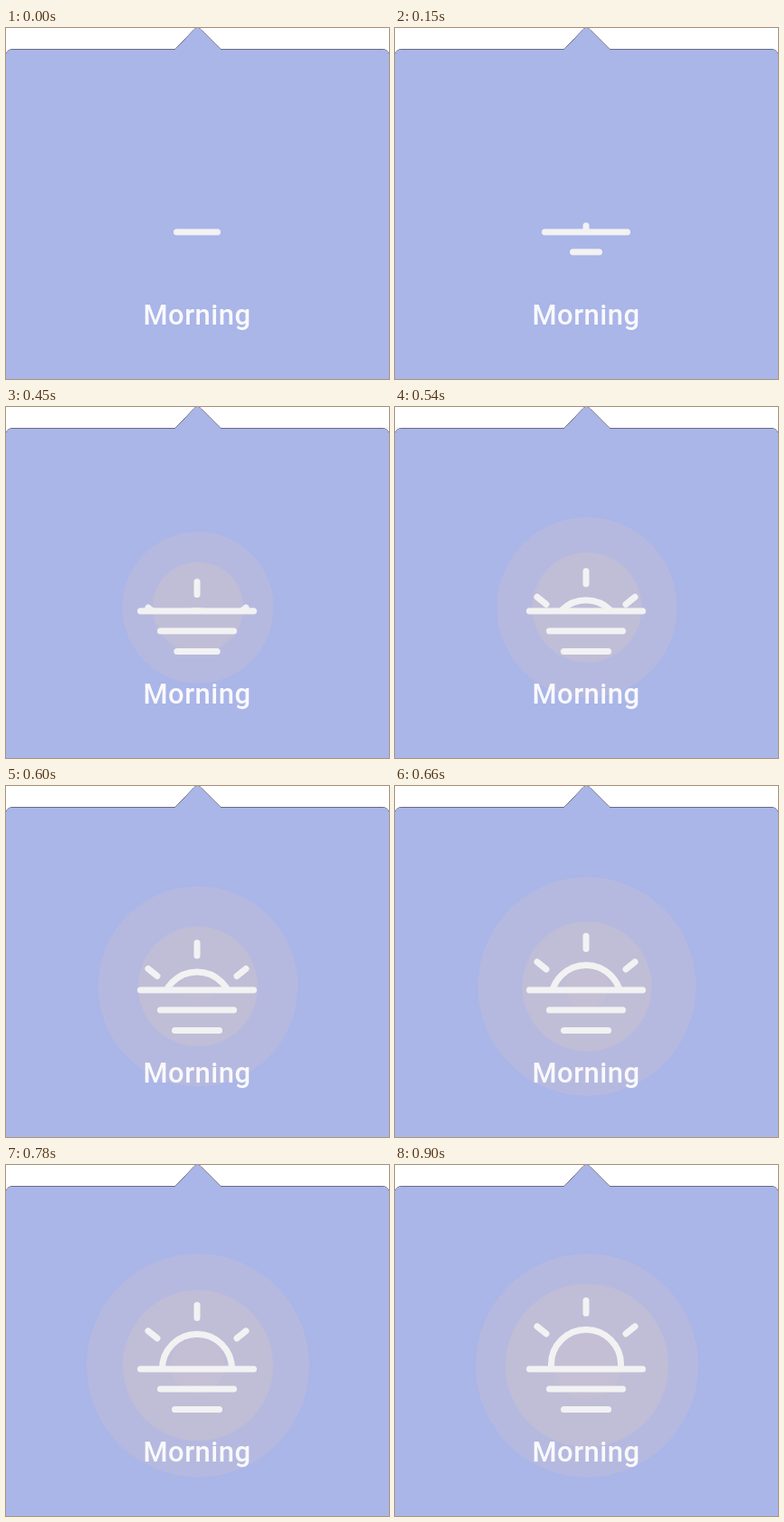
An HTML page with a canvas that plays this animation: 423x387 px, repeating every 1380 ms.

```html
<!DOCTYPE html>
<html lang="en">
<head>
<meta charset="utf-8">
<title>Morning</title>
<style>
html, body { margin: 0; width: 100%; height: 100%; overflow: hidden; background: #fff; }
canvas { display: block; }
</style>
</head>
<body>
<canvas id="stage" width="423" height="387"></canvas>
<script>
const ctx = document.getElementById('stage').getContext('2d');
const LOOP = 1380, STEP = 30, CX = 211, HORIZON = 225;

// Keys are [ms, value]; bars use half their full length.
const bars = [
  { y: HORIZON, keys: [[-150, 0], [0, 26], [150, 49], [300, 66]] },
  { y: 247, keys: [[0, 0], [150, 18], [300, 37], [450, 44]] },
  { y: 269.5, keys: [[170, 0], [300, 13.5], [420, 24], [540, 28]] }
];
const rings = [
  { alpha: 0.15, keys: [[180, 36], [300, 57], [540, 99.5], [660, 120.5], [690, 123]] },
  { alpha: 0.15, keys: [[330, 41], [540, 60.5], [660, 71.5], [780, 83], [900, 90]] },
  { alpha: 0.06, keys: [[570, 19], [660, 24], [780, 30], [900, 37]] }
];
const rise = [[30, 225], [150, 214.5], [300, 207], [540, 177.5], [660, 162], [780, 151], [900, 146]];

// Smooth curve through the keys, flat at both ends.
function curve(keys, t) {
  const last = keys.length - 1;
  if (t <= keys[0][0]) return keys[0][1];
  if (t >= keys[last][0]) return keys[last][1];
  const i = keys.findIndex(k => k[0] > t) - 1;
  const slope = j => j <= 0 || j >= last ? 0
    : (keys[j + 1][1] - keys[j - 1][1]) / (keys[j + 1][0] - keys[j - 1][0]);
  const [t0, a] = keys[i], [t1, b] = keys[i + 1];
  const d = t1 - t0, u = (t - t0) / d, v = 1 - u;
  return a * v * v * (1 + 2 * u) + b * u * u * (1 + 2 * v)
    + d * u * v * (slope(i) * v - slope(i + 1) * u);
}

function line(x1, y1, x2, y2) {
  ctx.beginPath();
  ctx.moveTo(x1, y1);
  ctx.lineTo(x2, y2);
  ctx.stroke();
}

function bubble() {
  ctx.beginPath();
  ctx.moveTo(-0.5, 31.5);
  ctx.quadraticCurveTo(0, 23.5, 8, 23.5);
  ctx.lineTo(187, 23.5);
  ctx.lineTo(208, 1.5);
  ctx.quadraticCurveTo(211.5, -2, 215, 1.5);
  ctx.lineTo(237, 23.5);
  ctx.lineTo(415, 23.5);
  ctx.quadraticCurveTo(423, 23.5, 423.5, 31.5);
  ctx.lineWidth = 1;
  ctx.strokeStyle = '#222';
  ctx.stroke();
  ctx.lineTo(423.5, 388);
  ctx.lineTo(-0.5, 388);
  ctx.fillStyle = '#aab5e8';
  ctx.fill();
}

function glow(t) {
  for (const { alpha, keys } of rings) {
    const fade = Math.min(1, Math.max(0, (t - keys[0][0] + STEP) / 120));
    ctx.fillStyle = `rgba(243, 208, 165, ${alpha * fade})`;
    ctx.beginPath();
    ctx.arc(212, 221, curve(keys, t), 0, 2 * Math.PI);
    ctx.fill();
  }
}

function sun(t) {
  const top = curve(rise, t);
  ctx.save();
  ctx.beginPath();
  ctx.rect(0, 0, 423, HORIZON);
  ctx.clip();
  line(CX, top + 3.5, CX, top + 17.5);
  for (const side of [-1, 1]) {
    line(CX + side * 54, top + 32, CX + side * 44, top + 40);
  }
  ctx.beginPath();
  ctx.arc(CX, top + 74, 38.5, 0, 2 * Math.PI);
  ctx.stroke();
  ctx.restore();
}

function draw(t) {
  ctx.clearRect(0, 0, 423, 387);
  bubble();
  glow(t);
  ctx.strokeStyle = '#f2f2f3';
  ctx.lineWidth = 7;
  ctx.lineCap = 'round';
  sun(t);
  for (const { y, keys } of bars) {
    const half = curve(keys, t);
    const reach = Math.max(0.01, half - 3.5);
    if (half > 0) line(CX - reach, y, CX + reach, y);
  }
  ctx.fillStyle = '#f9f9fc';
  ctx.font = '500 31px Roboto, sans-serif';
  ctx.letterSpacing = '0.5px';
  ctx.textAlign = 'center';
  ctx.fillText('Morning', CX, 326.5);
}

const start = performance.now();
function tick() {
  const t = (performance.now() - start) % LOOP;
  draw(Math.floor(t / STEP) * STEP);
  requestAnimationFrame(tick);
}
tick();
</script>
</body>
</html>
```
